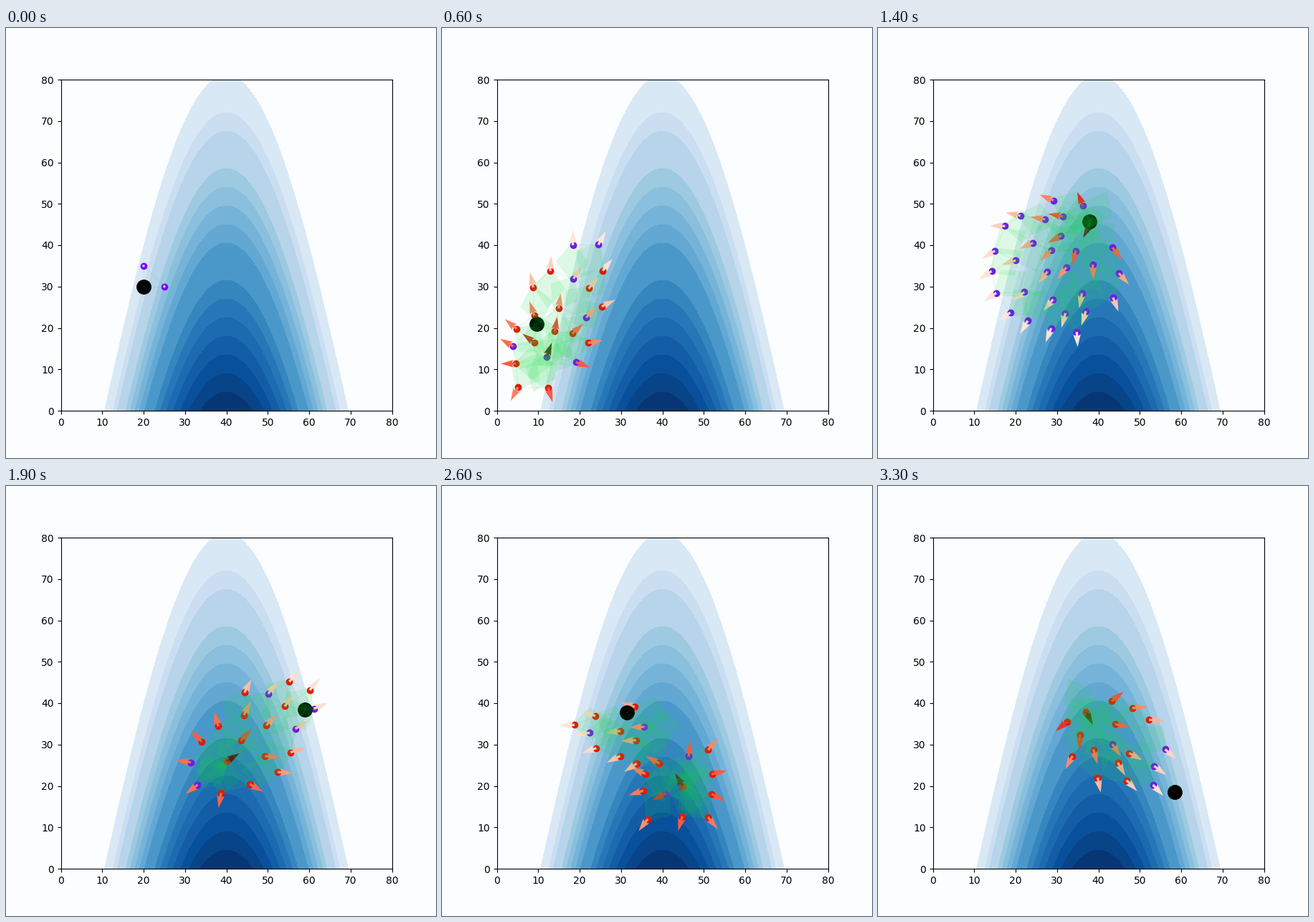
Write a matplotlib script that moves like this. It is 600 px wide and 600 px high and loops after 3.4 s.

```python
import itertools

import matplotlib.pyplot as plt
import numpy as np
from matplotlib.animation import FuncAnimation
from matplotlib.collections import LineCollection, PolyCollection

FRAMES, INTERVAL = 34, 100
RED, PURPLE, GREEN = "#ff0000", "#7f00ff", "#10dc38"
PAPER = "#fbfdff"
ARROW = 3.65   # arrow length
REACH = 8      # longest link between nodes

# Bursts of growth: time, node count, share of purple nodes,
# source point, ellipse centre, half axes and tilt in degrees
BURSTS = [
    (6, 22, 0.3, (12, 13), (15.5, 23), (20.5, 9.5), 63),
    (14, 30, 1.0, (38, 45), (29.5, 35), (17, 16), 90),
    (19, 20, 0.25, (40, 26), (46.5, 32), (18, 10.5), 38),
    (23, 17, 0.35, (46.5, 34), (35, 32), (16.5, 8), -8),
    (29, 27, 0.3, (45, 20), (41, 25), (21, 12), 105),
    (33, 17, 0.25, (37, 38), (44.5, 30), (13.5, 10), -35),
]

# Ball waypoints: time, x, y
PATH = np.array([
    (0, 20, 30), (4, 5, 15.5), (6, 9.6, 21), (11, 21.5, 55.2), (14, 37.9, 45.7),
    (19, 59, 38.4), (23, 24.9, 40.8), (29, 38.1, 34.8), (32, 63, 29.3), (33, 58.4, 18.5),
])


def scatter_nodes(rng, count, source, center, axes, tilt):
    """Evenly spread points in a tilted ellipse, starting at the source."""
    c, s = np.cos(np.radians(tilt)), np.sin(np.radians(tilt))
    points = np.array([source], float)
    while len(points) < count:
        r, a = np.sqrt(rng.random(40)), rng.uniform(0, 2 * np.pi, 40)
        u, v = axes[0] * r * np.cos(a), axes[1] * r * np.sin(a)
        tries = np.stack([c * u - s * v, s * u + c * v], axis=1) + center
        gaps = np.linalg.norm(tries[:, None] - points, axis=2).min(axis=1)
        points = np.vstack([points, tries[gaps.argmax()]])
    return points


def grow(seed, start, end, fade, count, share, source, *ellipse):
    """Nodes pointing away from the source, the nearest born and lost first."""
    rng = np.random.default_rng(seed)
    points = scatter_nodes(rng, count, source, *ellipse)
    away = points - source
    away[0] = np.subtract(ellipse[0], source)
    dist = np.linalg.norm(points - source, axis=1)
    heading = np.arctan2(away[:, 1], away[:, 0]) + rng.uniform(-0.3, 0.3, count)
    rank = dist.argsort().argsort() / (count - 1)
    purple = rng.permutation(count) < round(share * count)
    return [dict(pos=points[i], step=ARROW * np.array([np.cos(heading[i]), np.sin(heading[i])]),
                 shade=plt.cm.Reds(np.exp(-dist[i] / 12)),
                 color=PURPLE if purple[i] else RED,
                 birth=start + (end - start) * (0.15 + 0.8 * rank[i]),
                 death=end + (fade - end) * (0.25 + 0.6 * rank[i]))
            for i in range(count)]


def build():
    """All generations, newest first."""
    first = [dict(pos=np.array(p, float), step=np.zeros(2), shade=(1, 1, 1, 1),
                  color=PURPLE, birth=0, death=d)
             for p, d in (((20, 35), 3), ((25, 30), 5))]
    times = [0] + [b[0] for b in BURSTS] + [2 * FRAMES]
    later = [grow(k, times[k], times[k + 1], times[k + 2], *burst[1:])
             for k, burst in enumerate(BURSTS)]
    return [first, *later][::-1]


GENERATIONS = build()


def alive(t):
    """Nodes present at time t; new ones replace older ones they overlap."""
    shown = []
    for nodes in GENERATIONS:
        newer = [n["pos"] for n in shown]
        shown += [n for n in nodes if n["birth"] <= t < n["death"]
                  and all(np.hypot(*(n["pos"] - p)) > 2 for p in newer)]
    return shown


def kite(pos, step):
    """Green patch trailing behind a node's heading."""
    back = -step / ARROW
    side = np.array([-back[1], back[0]])
    return [pos - 0.8 * back, pos + 4 * back + 4 * side,
            pos + 9 * back, pos + 4 * back - 4 * side]


fig, ax = plt.subplots(figsize=(6, 6), dpi=100, facecolor=PAPER)
ax.set_facecolor(PAPER)
ax.set_aspect("equal")
gx, gy = np.meshgrid(np.linspace(0, 80, 241), np.linspace(0, 80, 241))
levels = [4.5 * k for k in range(2, 21) if k not in (3, 6, 12)]
ax.contourf(gx, gy, 90 * np.cos((gx - 40) / 20) - gy, levels=levels,
            cmap="Blues", vmin=0, vmax=90)
ax.set(xlim=(0, 80), ylim=(0, 80),
       xticks=range(0, 81, 10), yticks=range(0, 81, 10))

drawn = []


def update(t):
    while drawn:
        drawn.pop().remove()
    nodes = alive(t)
    pos = np.array([n["pos"] for n in nodes])
    step = np.array([n["step"] for n in nodes])
    ball = np.array([np.interp(t, PATH[:, 0], PATH[:, k]) for k in (1, 2)])

    for color in (RED, PURPLE):
        mine = [n["color"] == color for n in nodes]
        drawn.extend(ax.plot(*pos[mine].T, "o", color=color, ms=6, zorder=3))
    drawn.append(ax.quiver(*pos.T, *step.T, color=[n["shade"] for n in nodes],
                           angles="xy", scale_units="xy", scale=1,
                           width=0.0075, zorder=3.5))
    drawn.extend(ax.plot(*ball, "o", color="black", ms=14, zorder=4))

    kites = [kite(p, s) for p, s in zip(pos, step) if s.any()]
    drawn.append(ax.add_collection(PolyCollection(
        kites, facecolor=GREEN, edgecolor="none", alpha=0.12, zorder=5)))
    links = [(a, b) for a, b in itertools.combinations([ball, *pos], 2)
             if np.hypot(*(a - b)) < REACH]
    drawn.append(ax.add_collection(LineCollection(
        links, colors=GREEN, linewidths=0.8, alpha=0.12, zorder=5)))
    return drawn


anim = FuncAnimation(fig, update, frames=FRAMES, init_func=lambda: [],
                     interval=INTERVAL, repeat=True, repeat_delay=0)
plt.show()
```
